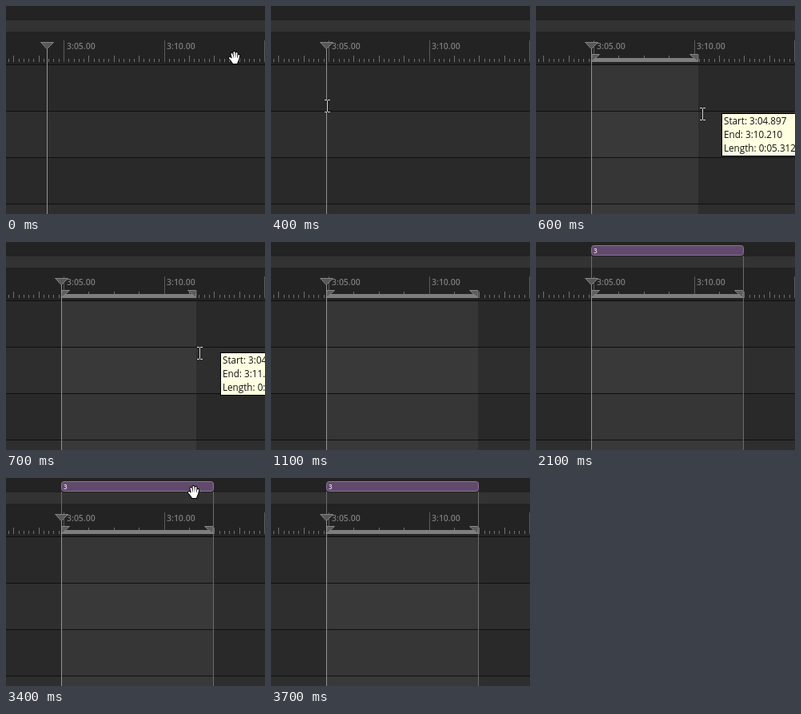
Write an HTML page with a canvas that moves like this. It is 324 px wide and 260 px high and loops after 4 s.

```html
<!DOCTYPE html>
<html lang="en">
<head>
<meta charset="utf-8">
<title>Timeline selection</title>
<style>
html, body { margin: 0; width: 100%; height: 100%; overflow: hidden; background: #232323; }
canvas { display: block; }
</style>
</head>
<body>
<canvas id="stage" width="324" height="260"></canvas>
<script>
const ctx = document.getElementById('stage').getContext('2d');
const W = 324, H = 260, LOOP = 4000, STEP = 100;
const PX_PER_SEC = 25.1, START = 184.8977, FINAL = 192.47;
const FONT = '"Open Sans", "Noto Sans", sans-serif';
const toX = sec => 72 + (sec - 185) * PX_PER_SEC;

// Pointer: [time, x, y, kind]
const pointer = [
  [0, 286, 65, 'hand'], [100, 241, 88, 'beam'], [200, 152, 111, 'beam'],
  [300, 88, 122, 'beam'], [400, 70, 125, 'beam'], [500, 108, 127, 'beam'],
  [600, 208, 135, 'beam'], [700, 242, 139, 'beam'], [800, 256, 141, 'beam'],
  [900, 263, 142, 'beam'], [1000, 296, 146, 'beam'], [1100, 0, 0, ''],
  [2700, 269, 165, 'beam'], [2800, 240, 112, 'beam'], [2900, 211, 57, 'hand'],
  [3000, 198, 28, 'hand'], [3100, 197, 19, 'hand'], [3200, 198, 16, 'hand'],
  [3300, 207, 16, 'hand'], [3400, 235, 18, 'hand'], [3500, 273, 21, 'hand'],
  [3600, 315, 25, 'hand'], [3700, 0, 0, '']
];
// Selection end: [time, seconds]
const dragEnd = [
  [0, 0], [500, 186.0911], [600, 190.21], [700, 191.63],
  [800, 192.16], [900, 192.43], [1000, FINAL]
];
// Tooltip corner: [time, x, y]
const tipAt = [[0, 0, 0], [500, 129, 126], [600, 232, 134], [700, 268, 138],
  [800, 280, 140], [900, 286, 141], [1000, 0, 0]];

const at = (track, t) => track.filter(k => k[0] <= t).pop();

function rect(x, y, w, h, fill) {
  ctx.fillStyle = fill;
  ctx.fillRect(x, y, w, h);
}

function poly(points, fill, stroke) {
  ctx.beginPath();
  points.forEach(([x, y]) => ctx.lineTo(x, y));
  ctx.closePath();
  ctx.fillStyle = fill;
  ctx.fill();
  if (stroke) {
    ctx.strokeStyle = stroke;
    ctx.lineWidth = 1;
    ctx.stroke();
  }
}

function text(str, x, y, font, fill) {
  ctx.font = font + ' ' + FONT;
  ctx.fillStyle = fill;
  ctx.fillText(str, x, y);
}

function clock(sec) {
  const ms = Math.floor(sec * 1000);
  const rest = String(ms % 60000).padStart(5, '0');
  return Math.floor(ms / 60000) + ':' + rest.slice(0, 2) + '.' + rest.slice(2);
}

function tracks(x, w, even, odd) {
  for (let i = 0; i < 4; i++) rect(x, 74 + i * 58, w, 58, i % 2 ? odd : even);
}

function ruler() {
  rect(0, 0, W, 73, '#232323');
  rect(0, 18, W, 14, '#333333');
  for (let i = -12; i <= 40; i++) {
    const x = Math.round(toX(185 + i / 4));
    const top = i % 20 === 0 ? 43 : i % 5 === 0 ? 62 : 66;
    rect(x, top, 1, 70 - top, top === 43 ? '#5c5c5c' : '#707070');
  }
  text('3:05.00', 76, 54, '600 10.5px', '#7c7c7c');
  text('3:10.00', 201, 54, '600 10.5px', '#7c7c7c');
}

function selection(endSec) {
  const a = 69, b = Math.round(toX(endSec));
  tracks(a, b - a, '#363636', '#393939');
  rect(a, 65, b - a, 5, '#7e7e7e');
  const left = a + 0.5, right = b - 0.5;
  poly([[left, 60.5], [left + 10, 60.5], [left, 69.5]], '#5c5c5c', '#858585');
  poly([[right, 60.5], [right - 10, 60.5], [right, 69.5]], '#5c5c5c', '#858585');
}

function marker() {
  rect(69, 17, 1, 243, '#6c6c6c');
  rect(259, 17, 1, 243, '#6c6c6c');
  ctx.beginPath();
  ctx.roundRect(69.5, 4.5, 190, 12, 3);
  ctx.fillStyle = '#624a6c';
  ctx.fill();
  ctx.strokeStyle = '#8d7499';
  ctx.lineWidth = 1;
  ctx.stroke();
  text('3', 72, 14, '600 8px', '#e6e0e8');
}

function playhead(x) {
  rect(x, 52, 1, H - 52, '#949494');
  poly([[x - 7.5, 45.5], [x + 8.5, 45.5], [x + 0.5, 53.5]], '#585858', '#858585');
}

function tooltip(x, y, end) {
  rect(x, y, 103, 54, '#000');
  rect(x + 1, y + 1, 101, 52, '#ffffe1');
  ['Start: ' + clock(START), 'End: ' + clock(end), 'Length: ' + clock(end - START)]
    .forEach((line, i) => text(line, x + 3, y + 14 + i * 17, '11.7px', '#111'));
}

function beam(x, y) {
  const parts = [[-3, -8, 3, 1], [1, -8, 3, 1], [0, -7, 1, 14], [-3, 7, 3, 1], [1, 7, 3, 1]];
  parts.forEach(([dx, dy, w, h]) => rect(x + dx - 1, y + dy, w + 2, h, '#202020'));
  parts.forEach(([dx, dy, w, h]) => rect(x + dx, y + dy, w, h, '#d8d8d8'));
}

function hand(x, y) {
  const fingers = [[-3.5, -5, -2, 1], [-0.5, -7, 0, 1], [2.5, -6, 2, 1], [5.2, -3, 4, 2], [-6, 0, -2.5, 4]];
  const shape = (color, grow) => {
    ctx.strokeStyle = ctx.fillStyle = color;
    ctx.lineCap = 'round';
    ctx.lineWidth = 2 + grow;
    fingers.forEach(([x1, y1, x2, y2]) => {
      ctx.beginPath();
      ctx.moveTo(x + x1, y + y1);
      ctx.lineTo(x + x2, y + y2);
      ctx.stroke();
    });
    ctx.beginPath();
    [[-4, 0], [4.5, 0], [4.5, 3], [3, 7], [-2, 7], [-4, 4]]
      .forEach(([dx, dy]) => ctx.lineTo(x + dx, y + dy));
    ctx.closePath();
    ctx.fill();
    if (grow) {
      ctx.lineWidth = grow;
      ctx.stroke();
    }
  };
  shape('#000', 2);
  shape('#fff', 0);
}

function draw(time) {
  const t = Math.floor((time % LOOP) / STEP) * STEP;
  ruler();
  tracks(0, W, '#292929', '#2e2e2e');
  const end = at(dragEnd, t)[1];
  if (end) selection(end);
  for (let y = 73; y < H; y += 58) rect(0, y, W, 1, '#0f0f0f');
  if (t >= 2100) marker();
  playhead(t < 400 ? 51 : 69);
  const [, tipX, tipY] = at(tipAt, t);
  if (tipX) tooltip(tipX, tipY, end);
  const [, x, y, kind] = at(pointer, t);
  if (kind === 'hand') hand(x, y);
  if (kind === 'beam') beam(x, y);
}

const begin = performance.now();
function tick() {
  draw(performance.now() - begin);
  requestAnimationFrame(tick);
}
tick();
</script>
</body>
</html>
```
